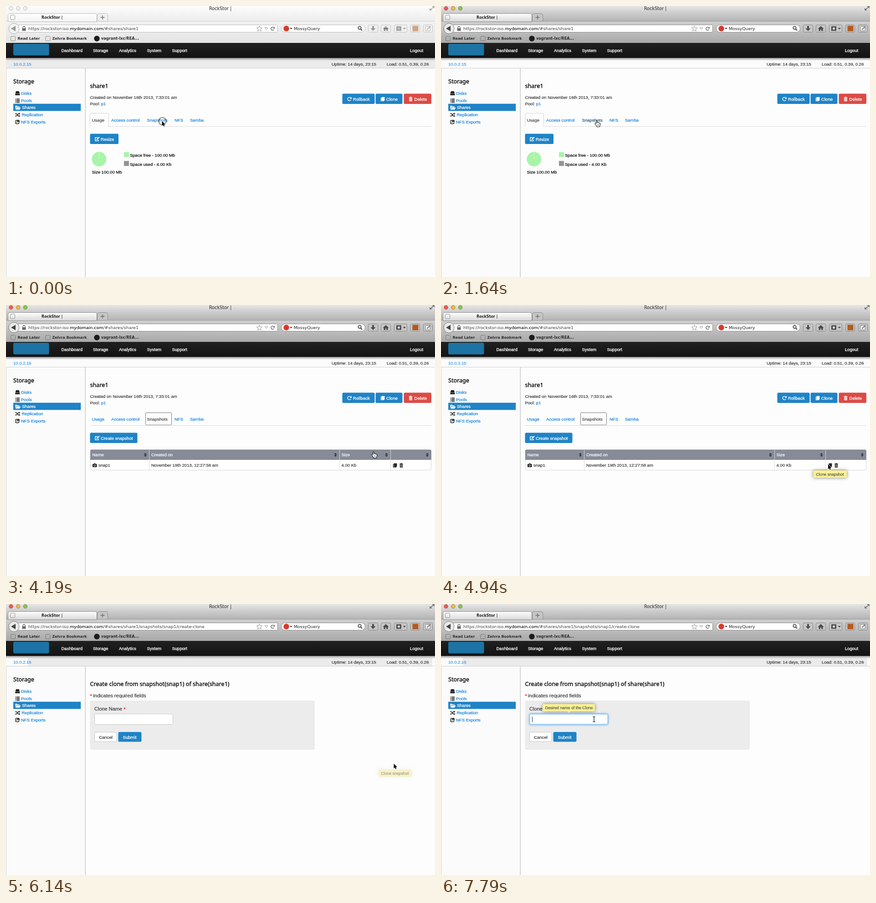
An HTML page with a canvas for the animation above (8 s loop, 942 by 595 pixels).

```html
<!DOCTYPE html>
<html lang="en">
<head>
<meta charset="utf-8">
<title>RockStor</title>
<style>
html, body { margin: 0; width: 100%; height: 100%; overflow: hidden; background: #fdfdfd; }
canvas { display: block; }
</style>
</head>
<body>
<canvas id="stage" width="942" height="595"></canvas>
<script>
const ctx = document.getElementById('stage').getContext('2d');
const LOOP = 8000;
const SANS = '"Liberation Sans", Arial, sans-serif';
const UI = '"DejaVu Sans", sans-serif';
const BLUE = '#1f83c6', LINK = '#0b7fe0', INK = '#333';
const HEADING = { font: '"Noto Sans", sans-serif', size: 12.6, color: '#111', heavy: 0.4 };

const HAND = new Path2D('M-1.1 6.5V1.2Q0-.6 1.2 1.2V5.2Q2.5 4.2 3.6 5.5Q5 4.8 6 6.2Q7.6 6 7.6 7.6Q7.8 10.5 6.2 14.3H.2Q-1.2 11-3.6 8Q-4.4 6-2.6 6Z');
const ARROW = new Path2D('M0 0V10.6L2.4 8.4L4 12L5.8 11.2L4.3 7.8H7.4Z');

// time, x, y, shape
const CURSOR = [
  [0, 342.5, 252.5, 'arrow'], [150, 342, 251, 'hand'], [1490, 342, 251, 'arrow'],
  [1640, 342, 251, 'hand'], [2240, 342.5, 248, 'arrow'], [3290, 350, 252, 'arrow'],
  [3440, 398, 276, 'arrow'], [3590, 468, 308, 'arrow'], [3740, 523, 329, 'hand'],
  [4040, 650, 309, 'hand'], [4190, 807, 321.5, 'hand'], [4340, 838, 341, 'arrow'],
  [4490, 850, 350, 'arrow'], [5090, 853, 350.5, 'hand'], [6140, 851.5, 350.5, 'arrow'],
  [6590, 790, 342, 'arrow'], [6740, 590, 300, 'arrow'], [6890, 400, 262, 'arrow'],
  [7040, 336, 253, 'text']
];

function text(str, x, y, { size = 9.5, color = INK, font = SANS, weight = '', heavy = 0.2 } = {}) {
  ctx.font = `${weight} ${size}px ${font}`;
  ctx.fillStyle = color;
  const base = y + size * 0.36;
  ctx.fillText(str, x, base);
  if (heavy) {
    ctx.strokeStyle = color;
    ctx.lineWidth = heavy;
    ctx.strokeText(str, x, base);
  }
  return x + ctx.measureText(str).width;
}

function rect(x, y, w, h, color) {
  ctx.fillStyle = color;
  ctx.fillRect(x, y, w, h);
}

function box(x, y, w, h, r, fill, stroke, width = 1) {
  ctx.beginPath();
  ctx.roundRect(x, y, w, h, r);
  if (fill) { ctx.fillStyle = fill; ctx.fill(); }
  if (stroke) { ctx.strokeStyle = stroke; ctx.lineWidth = width; ctx.stroke(); }
}

function disc(x, y, r, fill, stroke, width = 1) {
  ctx.beginPath();
  ctx.arc(x, y, r, 0, 7);
  if (fill) { ctx.fillStyle = fill; ctx.fill(); }
  if (stroke) { ctx.strokeStyle = stroke; ctx.lineWidth = width; ctx.stroke(); }
}

function poly(points, fill, stroke, width = 1) {
  ctx.beginPath();
  for (let i = 0; i < points.length; i += 2) ctx.lineTo(points[i], points[i + 1]);
  if (fill) { ctx.closePath(); ctx.fillStyle = fill; ctx.fill(); }
  if (stroke) { ctx.strokeStyle = stroke; ctx.lineWidth = width; ctx.stroke(); }
}

function shade(y0, y1, ...colors) {
  const g = ctx.createLinearGradient(0, y0, 0, y1);
  colors.forEach((c, i) => g.addColorStop(i / (colors.length - 1), c));
  return g;
}

function faded(alpha, draw) {
  ctx.save();
  ctx.globalAlpha = alpha;
  draw();
  ctx.restore();
}

function shadowed(color, blur, draw) {
  ctx.save();
  ctx.shadowColor = color;
  ctx.shadowBlur = blur;
  draw();
  ctx.restore();
}

function reload(x, y, r, color, width) {
  ctx.beginPath();
  ctx.arc(x, y, r, 0.5, 5.4);
  ctx.strokeStyle = color;
  ctx.lineWidth = width;
  ctx.stroke();
  poly([x + r + 1, y - r - 1, x + r + 1, y - 0.3, x + 0.6, y - 0.3], color);
}

function pencil(x, y, color) {
  poly([x + 2, y - 3, x - 4, y - 3, x - 4, y + 4, x + 3, y + 4, x + 3, y + 1], null, color, 1.4);
  poly([x - 1, y + 1.5, x + 5, y - 4], null, color, 2);
}

function sheets(x, y, color) {
  poly([x - 3.6, y - 3, x - 3.6, y + 4.2, x + 3, y + 4.2], null, color, 1.2);
  rect(x - 2.4, y - 4.4, 6.8, 7.8, color);
}

function bin(x, y, color, gap) {
  rect(x - 4, y - 3.6, 8, 1.3, color);
  rect(x - 1.6, y - 5, 3.2, 1.5, color);
  rect(x - 3.2, y - 1.8, 6.4, 6.6, color);
  [-1.7, 0, 1.7].forEach(d => rect(x + d - 0.3, y - 0.8, 0.6, 4.4, gap));
}

function placeholder(x, y) {
  ctx.setLineDash([2, 1.3]);
  box(x, y, 10, 10, 1.5, null, '#555', 1);
  ctx.setLineDash([]);
}

function button(x, y, w, h, label, labelX, color = BLUE) {
  box(x - 0.5, y - 0.5, w + 1, h + 1, 2.5, color);
  text(label, labelX, y + h / 2 + 0.4, { color: '#fff', size: 9.6, heavy: 0.3 });
}

function drawChrome(live, url) {
  rect(0, 0, 942, 34, live ? shade(0, 34, '#e6e6e6', '#cacaca', '#b3b3b3') : shade(0, 34, '#fdfdfd', '#f4f4f4', '#ececec'));
  rect(0, 34, 942, 47, live ? shade(34, 81, '#cfcfcf', '#a9a9a9') : shade(34, 81, '#f2f2f2', '#e4e4e4'));
  rect(0, 33, 942, 1, live ? '#999' : '#cfcfcf');

  const lamps = live ? ['#f35a4f', '#f5b83d', '#83c851'] : ['#eee', '#eee', '#eee'];
  lamps.forEach((c, i) => disc(11 + 15.7 * i, 5.2, 4.3, c, live ? 'rgba(70,40,10,.55)' : '#aaa', 0.8));
  text('RockStor |', 446, 6, { font: UI, size: 9.7, color: '#444' });
  faded(live ? 1 : 0.6, () => {
    poly([931, 9, 940, 1], null, '#555', 1.2);
    poly([935.5, 1, 940, 1, 940, 5], null, '#555', 1.2);
    poly([931, 5, 931, 9, 935.5, 9], null, '#555', 1.2);
  });

  box(4.5, 16.5, 195, 18, [4, 4, 0, 0], live ? shade(16, 34, '#fff', '#dadada') : shade(16, 34, '#fff', '#f4f4f4'), live ? '#8d8d8d' : '#bbb');
  box(200.5, 16.5, 23, 17, [4, 4, 0, 0], live ? '#c5c5c5' : '#f0f0f0', live ? '#8d8d8d' : '#bbb');
  rect(207.5, 24.4, 9, 1.4, '#666');
  rect(211.3, 20.6, 1.4, 9, '#666');
  placeholder(9.5, 20);
  text('RockStor |', 78, 25, { font: UI, size: 8, weight: 'bold', color: '#222', heavy: 0 });

  box(20.5, 41.5, 576, 16, 2, '#fff', live ? '#8f8f8f' : '#bbb');
  disc(17.5, 49.5, 11.5, live ? '#e9e9e9' : '#f3f3f3', live ? '#777' : '#aaa');
  poly([11, 49.5, 21, 43.5, 21, 55.5], live ? '#444' : '#999');
  rect(35.5, 49, 8, 5.5, '#666');
  box(37, 45, 5, 6, 2.5, null, '#666', 1.3);
  const urlStyle = { font: UI, size: 9.45, color: '#5c5c5c', heavy: 0.15 };
  let x = text('https://rockstor-iso.', 49, 50, urlStyle);
  x = text('mydomain.com', x, 50, { ...urlStyle, color: '#111' });
  text(url, x, 50, urlStyle);

  const star = [];
  for (let i = 0; i < 11; i++) {
    const r = i % 2 ? 2.8 : 6.5, a = i * Math.PI / 5;
    star.push(556.5 + r * Math.sin(a), 50 - r * Math.cos(a));
  }
  poly(star, '#fff', '#999');
  poly([568, 47.5, 575, 47.5, 571.5, 52, 568, 47.5], null, '#999', 0.9);
  reload(585.5, 49.8, 3.6, '#666', 1.4);

  box(604.5, 41.5, 184, 16, 8, '#fff', live ? '#8f8f8f' : '#bbb');
  disc(615.5, 49.5, 6.2, '#d8392b');
  poly([623, 48, 629, 48, 626, 51.3], '#444');
  text('MossyQuery', 632, 50, { font: UI, size: 9.4, color: '#4c4c4c' });
  disc(776.5, 48, 3.2, null, '#444', 1.6);
  poly([779, 50.5, 782, 53.7], null, '#444', 2);

  for (const [bx, w] of [[795, 22], [823, 22], [852, 29], [888, 21], [916, 21]])
    box(bx + 0.5, 41.5, w - 1, 16, 2, live ? '#c6c6c6' : '#f0f0f0', live ? '#868686' : '#c2c2c2');
  faded(live ? 1 : 0.5, () => {
    const c = '#4b4b4b';
    rect(804, 44, 4, 6, c);
    poly([800.5, 49, 811.5, 49, 806, 55], c);
    poly([827.5, 50, 834, 44, 840.5, 50], c);
    rect(829.5, 49, 3.4, 6, c);
    rect(835.2, 49, 3.4, 6, c);
    rect(829.5, 49, 9, 2.5, c);
    box(857, 44.5, 11, 10, 1, c);
    poly(star.map((v, i) => i % 2 ? 49.5 + (v - 50) * 0.6 : 862.5 + (v - 556.5) * 0.6), '#eee');
    poly([871.5, 48, 878, 48, 874.8, 51.5], c);
    rect(892.5, 43.5, 13, 12, '#b35a20');
    box(921, 45, 10, 9.5, 1, '#fff', '#777');
    poly([924, 52, 932, 44.5], null, '#777', 2);
  });

  const mark = { font: UI, size: 7.95, weight: 'bold', color: '#2b2b2b', heavy: 0 };
  placeholder(10.5, 66.5);
  text('Read Later', 25.5, 71.5, mark);
  placeholder(87, 66.5);
  text('Zelvra Bookmark', 101.5, 71.5, mark);
  disc(199.5, 71.5, 6.2, '#1c1c1c');
  text('vagrant-lxc/REA...', 209, 71.5, { ...mark, size: 8.2 });
}

function drawSite(t) {
  rect(0, 81, 942, 514, '#fdfdfd');
  rect(0, 137, 174, 458, '#fbfbfb');
  rect(0, 114, 942, 23, t < 150 ? '#ebebeb' : '#fbfbfb');
  if (t >= 6140) rect(48, 118, 888, 19, '#ebebeb');
  rect(0, 114, 942, 6, shade(114, 120, 'rgba(0,0,0,.38)', 'rgba(0,0,0,0)'));
  rect(0, 136, 942, 1, '#cfcfcf');
  rect(0, 81, 942, 33, shade(81, 114, '#202020', '#131313'));
  box(16, 83, 78.5, 25.5, 3, '#1d73a3');

  const nav = { color: '#fff', heavy: 0.35 };
  [['Dashboard', 121.5], ['Storage', 191], ['Analytics', 248], ['System', 309.5], ['Support', 364.5], ['Logout', 887]]
    .forEach(([label, x]) => text(label, x, 98, nav));
  text('10.0.2.15', 16, 128, { color: '#2d97ea' });
  text('Uptime: 14 days, 23:15', 715, 128);
  text('Load: 0.51, 0.39, 0.26', 836, 128);

  rect(173.5, 137, 1.5, 458, '#c9c9c9');
  rect(0, 137, 1, 458, '#d5d5d5');
  text('Storage', 16, 165.5, HEADING);
  rect(16, 214.6, 148.2, 15.8, BLUE);
  text('Disks', 33, 191.5, { color: LINK });
  text('Pools', 33, 207.5, { color: LINK });
  text('Shares', 35, 223, { color: '#fff', heavy: 0.3 });
  text('Replication', 34.5, 239, { color: LINK });
  text('NFS Exports', 33, 254.5, { color: LINK });

  poly([22, 187, 28.5, 187, 30, 192, 20.5, 192], '#222');
  rect(20.3, 192.5, 10, 3.5, '#222');
  for (let i = 0; i < 4; i++) {
    rect(20.5, 203.4 + i * 2.5, 1.6, 1.5, '#222');
    rect(23, 203.4 + i * 2.5, 7, 1.5, '#222');
  }
  poly([20.5, 227, 20.5, 219, 24, 219, 25, 220.5, 30, 220.5, 30, 222, 23, 222], '#fff');
  poly([23.6, 222.8, 32.5, 222.8, 30, 227.6, 21, 227.6], '#fff');
  poly([20, 236.5, 23, 236.5, 27, 241.5, 29, 241.5], null, '#222', 1.4);
  poly([20, 241.5, 23, 241.5, 27, 236.5, 29, 236.5], null, '#222', 1.4);
  [236.5, 241.5].forEach(y => poly([28.5, y - 2.2, 31.5, y, 28.5, y + 2.2], '#222'));
  box(21, 251, 7.5, 7.5, 1.5, null, '#222', 1.4);
  poly([24, 256, 25, 252.5, 28, 252.5], null, '#222', 1.7);
  poly([27, 249.5, 30.6, 252.5, 27, 255.5], '#222');
}

function drawTabs(t) {
  const snaps = t >= 2090, focused = t >= 3290 && t < 5840;
  rect(185, 264, 749, 1, '#d9d9d9');
  const [x, w] = snaps ? [306, 58] : [185, 40];
  rect(x, 236, w, 29, '#fdfdfd');
  if (focused) box(x + 0.5, 236.5, w - 1, 27, 1, null, '#777');
  else {
    ctx.beginPath();
    ctx.moveTo(x - 0.5, 265);
    ctx.lineTo(x - 0.5, 239);
    ctx.arcTo(x - 0.5, 235.5, x + 4, 235.5, 2.5);
    ctx.arcTo(x + w + 0.5, 235.5, x + w + 0.5, 240, 2.5);
    ctx.lineTo(x + w + 0.5, 265);
    ctx.strokeStyle = '#d5d5d5';
    ctx.lineWidth = 1;
    ctx.stroke();
  }
  const hover = t >= 150 ? '#17527f' : LINK;
  text('Usage', 188.5, 251, { color: snaps ? LINK : '#444' });
  text('Access control', 231, 251, { color: LINK, size: 9.6 });
  text('Snapshots', 309.5, 251, { color: snaps ? '#444' : hover, size: 9.6 });
  text('NFS', 370, 251, { color: LINK });
  text('Samba', 404, 251, { color: LINK });
}

function drawUsage() {
  button(185, 281, 61.5, 21.5, 'Resize', 208);
  pencil(200, 292, '#fff');
  disc(204.3, 336.3, 16, '#a8f5aa');
  poly([204.3, 336, 204.3, 320], null, '#e4fbe4', 0.8);
  rect(259, 320.7, 11, 11, '#a8f5aa');
  rect(259, 340.2, 11, 11, '#949494');
  const dark = { color: '#000' };
  text('Space free - 100.00 Mb', 272, 328, dark);
  text('Space used - 4.00 Kb', 272, 347.5, dark);
  text('Size 100.00 Mb', 188.5, 364.5, dark);
}

function drawSnapshots() {
  button(185, 281, 103, 21.5, 'Create snapshot', 208);
  pencil(200, 292, '#fff');
  box(185.5, 318, 748, 44.5, 3, '#fff', '#d8d8d8');
  box(185, 317.5, 749, 22.5, [3, 3, 0, 0], '#868b97');
  for (const x of [314, 732, 844]) {
    rect(x, 318, 1, 22, '#d4d6db');
    rect(x, 340, 1, 22, '#dcdcdc');
  }
  for (const x of [306, 723.5, 835.5, 925]) {
    poly([x - 2.8, 328.2, x + 2.8, 328.2, x, 325], '#1c1c1c');
    poly([x - 2.8, 329.8, x + 2.8, 329.8, x, 333], '#1c1c1c');
  }
  const head = { color: '#fff', heavy: 0.25 };
  text('Name', 189.5, 329, head);
  text('Created on', 319, 329, head);
  text('Size', 736.5, 329, head);
  box(190, 349, 9.5, 7, 1, '#222');
  rect(193, 347.8, 3.5, 2, '#222');
  disc(194.8, 352.5, 1.9, '#222', '#fff', 0.9);
  text('snap1', 203, 352);
  text('November 19th 2013, 12:27:58 am', 319, 352);
  text('4.00 Kb', 736.5, 352);
  sheets(854, 352, '#222');
  bin(868, 352, '#222', '#fff');
}

function drawShare(t) {
  text('share1', 184.5, 175, HEADING);
  text('Created on November 16th 2013, 7:33:01 am', 184.5, 200.5);
  const x = text('Pool: ', 184.5, 214.5);
  text('p1', x, 214.5, { color: LINK });
  button(739, 193, 70, 21.5, 'Rollback', 762);
  reload(754, 204.3, 3.8, '#fff', 1.5);
  button(812, 193, 58, 21.5, 'Clone', 835);
  sheets(827, 204.3, '#fff');
  button(874, 193, 59.5, 21.5, 'Delete', 896.5, '#dc4b45');
  bin(888.5, 204.3, '#fff', '#dc4b45');
  drawTabs(t);
  if (t < 2090) drawUsage(); else drawSnapshots();
}

function drawForm(t) {
  text('Create clone from snapshot(snap1) of share(share1)', 184.5, 175, HEADING);
  text('*', 184.5, 202, { size: 11, color: '#e00' });
  text('indicates required fields', 191, 201.5, { size: 11.1 });
  box(184.5, 212, 493.5, 108, 4, '#ececec');
  const x = text('Clone Name ', 194, 230.5, { size: 11 });
  text('*', x, 231, { size: 11, color: '#e00' });

  const glow = t < 7490 ? 0 : t < 7640 ? 0.4 : t < 7790 ? 0.8 : 1;
  box(194.5, 241.5, 172, 23, 3, '#fff', '#c9c9c9');
  if (glow) faded(glow, () => shadowed('rgba(82,168,236,.8)', 5, () => box(194.5, 241.5, 172, 23, 3, '#fff', '#67b2ea')));
  if (t >= 7790) rect(200, 247.5, 1, 12, '#333');

  box(194.5, 281.5, 48.5, 20.5, 2.5, '#fff', '#c8c8c8');
  text('Cancel', 204, 292.3, { size: 9.6 });
  button(247, 281.5, 50, 20.5, 'Submit', 256.5);
}

function tooltip(x, y, w, h, label, tip, alpha) {
  if (!alpha) return;
  faded(alpha, () => {
    shadowed(`rgba(0,0,0,${alpha * alpha / 2})`, 7, () => box(x, y, w, h, 3, '#f8f094'));
    const edge = tip.up ? y : y + h;
    poly([tip.x - 3.5, edge, tip.x + 3.5, edge, tip.x, edge + (tip.up ? -3 : 3)], '#f8f094');
    text(label, x + 5.7, y + h / 2 + 0.2, { size: 8.8, color: '#555' });
  });
}

function drawCursor(t) {
  const [, x, y, shape] = CURSOR.findLast(k => k[0] <= t);
  if (t < 440) disc(343.5, 253, 8.2, null, '#222', 1.1);
  ctx.save();
  ctx.translate(x, y);
  ctx.lineJoin = 'round';
  if (shape === 'arrow') {
    ctx.strokeStyle = '#fff';
    ctx.lineWidth = 1.6;
    ctx.stroke(ARROW);
    ctx.fillStyle = '#000';
    ctx.fill(ARROW);
  } else if (shape === 'hand') {
    ctx.fillStyle = '#fff';
    ctx.fill(HAND);
    ctx.strokeStyle = '#111';
    ctx.lineWidth = 1.1;
    ctx.stroke(HAND);
    [2, 4].forEach(d => poly([d, 8.5, d, 12], null, '#333', 0.8));
  } else {
    rect(-0.6, -5, 1.2, 10, '#111');
    [-6, 5].forEach(d => rect(-2.6, d, 5.2, 1.1, '#111'));
  }
  ctx.restore();
}

function render(t) {
  const form = t >= 6140;
  drawSite(t);
  drawChrome(t >= 150, form ? '/#shares/share1/snapshots/snap1/create-clone' : '/#shares/share1');
  if (form) drawForm(t); else drawShare(t);

  const cloneTip = t < 4640 || t >= 6290 ? 0 : t < 4790 || form ? 0.45 : 1;
  tooltip(817.5, 363, 73.5, 16.5, 'Clone snapshot', { x: 854, up: true }, cloneTip);
  tooltip(223, 219.5, 115, 16.5, 'Desired name of the Clone', { x: 281, up: false }, t >= 7040 ? 1 : 0);
  drawCursor(t);
}

const start = performance.now();
function tick() {
  render((performance.now() - start) % LOOP);
  requestAnimationFrame(tick);
}
tick();
</script>
</body>
</html>
```
